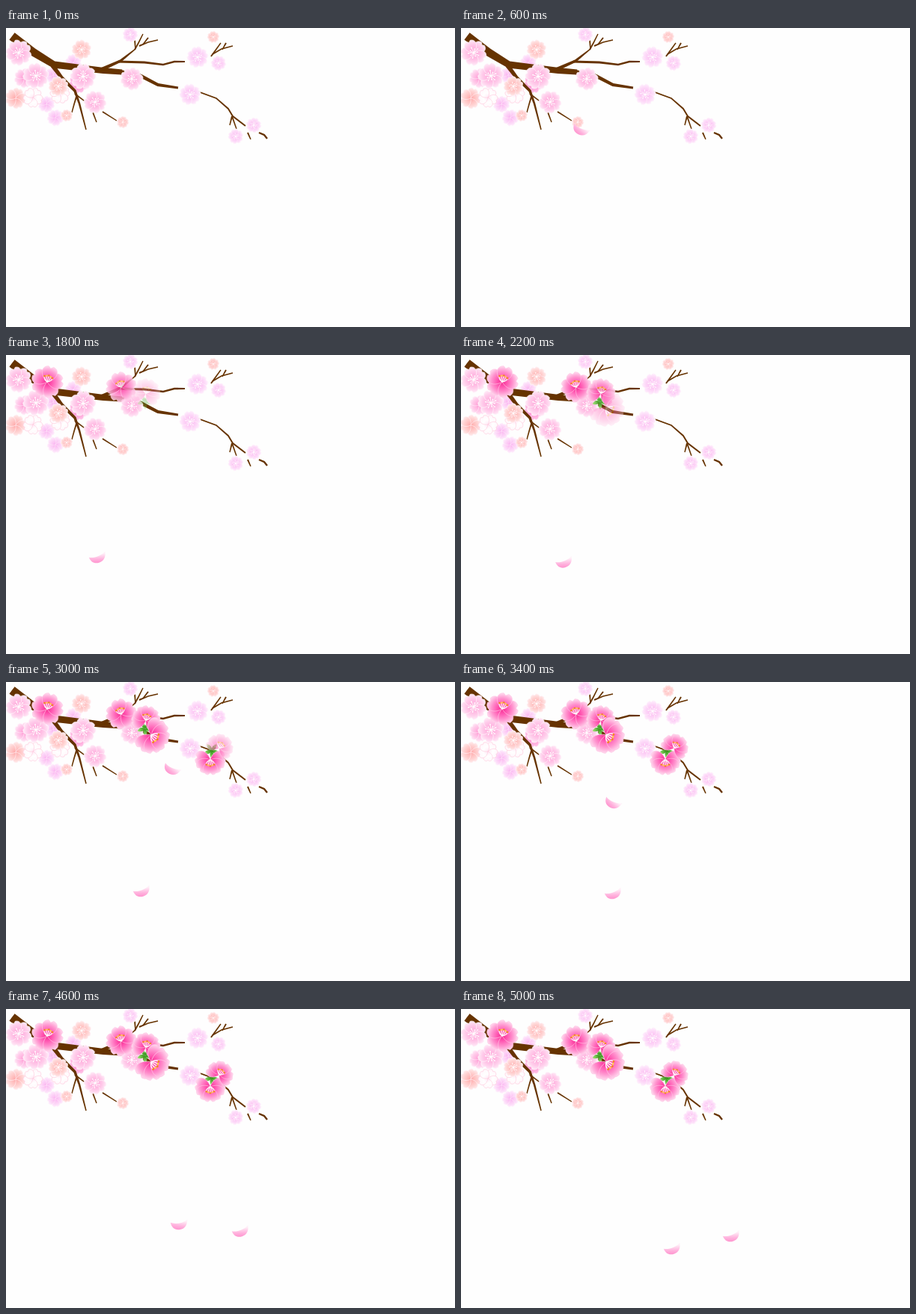
An HTML page for the animation above (5.2 s loop, 600 by 400 pixels).

```html
<!DOCTYPE html>
<html lang="en">
<head>
<meta charset="utf-8">
<title>Blossom branch</title>
<style>
html, body { margin: 0; width: 100%; height: 100%; overflow: hidden; background: #fefefe; }
svg { display: block; width: 600px; height: 400px; }
</style>
</head>
<body>
<svg viewBox="0 0 600 400" xmlns="http://www.w3.org/2000/svg">
  <defs id="defs">
    <linearGradient id="drop" x1="0" y1="1" x2=".6" y2="0">
      <stop offset="0" stop-color="#ff86c8"/>
      <stop offset=".5" stop-color="#ffb2dd"/>
      <stop offset="1" stop-color="#fff0f8"/>
    </linearGradient>
    <linearGradient id="leaf" x1="0" y1="0" x2="0" y2="1">
      <stop offset="0" stop-color="#2a8c10"/>
      <stop offset="1" stop-color="#a6ea7c"/>
    </linearGradient>
    <path id="lobe" d="M0 0C-.6-.3-.62-.92-.16-1L0-.88L.16-1C.62-.92.6-.3 0 0Z"/>
    <path id="blade" d="M0 0Q-5 5 0 11Q5 5 0 0Z" fill="url(#leaf)"/>
  </defs>
  <g id="back"></g>
  <g id="wood" fill="#663300"></g>
  <g id="front"></g>
  <g id="blooms"></g>
  <g id="falling"></g>
</svg>
<script>
const LOOP = 5200, STEP = 200, FADE = 650;
const el = id => document.getElementById(id);
const clamp = v => Math.max(0, Math.min(1, v));
const points = text => text.split(' ').map(p => p.split(',').map(Number));

function add(parent, tag, attrs = {}) {
  const node = document.createElementNS('http://www.w3.org/2000/svg', tag);
  for (const key in attrs) node.setAttribute(key, attrs[key]);
  parent.appendChild(node);
  return node;
}

function radial(id, ...colors) {
  const g = add(el('defs'), 'radialGradient', { id, gradientUnits: 'userSpaceOnUse', cx: 0, cy: 0, r: 1 });
  colors.forEach((c, i) => add(g, 'stop', { offset: i / (colors.length - 1), 'stop-color': c }));
}

radial('pink', '#ff92d0', '#ffb4e0', '#ffcbea', '#ffeaf7');
radial('salmon', '#ffa3a3', '#ffbebe', '#ffd2d2', '#ffecec');
radial('lilac', '#f9acef', '#fcc6f4', '#fdd8f8', '#feeffd');
radial('hot', '#ff7fcb', '#ff9fd8', '#ffc9ea');
radial('white', '#ffeaf6', '#ffffff', '#fff7fb');
radial('bloom', '#f52a90', '#ff58b2', '#ff92ce', '#ffd9ee');

// Tapering branch along a line of points
function limb(w0, w1, text) {
  const line = points(text), last = line.length - 1, left = [], right = [];
  line.forEach(([x, y], i) => {
    const a = line[Math.max(0, i - 1)], b = line[Math.min(last, i + 1)];
    const dx = b[0] - a[0], dy = b[1] - a[1];
    const k = (w0 + (w1 - w0) * i / last) / 2 / Math.hypot(dx, dy);
    left.push([x + dy * k, y - dx * k]);
    right.unshift([x - dy * k, y + dx * k]);
  });
  add(el('wood'), 'polygon', { points: left.concat(right).join(' ') });
}

function blossom(layer, fill, r, x, y, star, edge) {
  const g = add(el(layer), 'g', { transform: `translate(${x} ${y}) rotate(${x * 7 % 72}) scale(${r})` });
  for (let i = 0; i < 5; i++)
    add(g, 'use', { href: '#lobe', transform: `rotate(${i * 72})`, fill: `url(#${fill})`, stroke: edge, 'stroke-width': .04 });
  for (let i = 0; star && i < 10; i++) {
    const cy = i % 2 ? -.3 : -.43, ray = add(g, 'g', { transform: `rotate(${i * 36})`, fill: '#fff' });
    add(ray, 'path', { d: `M0 0V${cy}`, stroke: '#fff', 'stroke-width': .05 });
    add(ray, 'circle', { cy, r: .05 });
  }
}

function scatter(layer, fill, r, text, edge = '#fff5fb') {
  for (const [x, y] of points(text)) blossom(layer, fill, r, x, y, layer === 'front', edge);
}

function leaves(parent, x, y) {
  for (let i = 0; i < 5; i++)
    add(parent, 'use', { href: '#blade', transform: `translate(${x} ${y}) rotate(${i * 72})` });
}

// Petals fan out from the base around `aim`; a spread of 72 makes a full circle
function bloom(x, y, size, aim, spread, leafAt) {
  const node = add(el('blooms'), 'g');
  if (leafAt) leaves(node, ...leafAt);
  const g = add(node, 'g', { transform: `translate(${x} ${y}) rotate(${aim}) scale(${size})` });
  for (const i of [-2, 2, -1, 1, 0])
    add(g, 'use', { href: '#lobe', transform: `rotate(${i * spread})`, fill: 'url(#bloom)', stroke: '#ffc6e5', 'stroke-width': .03 });
  for (let i = -2; i <= 2; i++) {
    const px = i * .13, py = Math.abs(i) * .05 - .42;
    add(g, 'path', { d: `M0 0Q${px} -.1 ${px} ${py}`, fill: 'none', stroke: '#fff', 'stroke-width': .055 });
    add(g, 'circle', { cx: px, cy: py, r: .06, fill: i % 2 ? '#ffd24a' : '#f28a1c' });
  }
  return node;
}

limb(12, 7, '8,11 36,32 64,49 130,57 155,59');
limb(6, 3, '153,59 180,64 203,76 230,80');
limb(6, 1.5, '62,50 74,66 92,84 98,101 107,136');
limb(5, 1.5, '124,57 153,44 173,28');
limb(3, 2.2, '150,45 185,46 210,49 225,45 239,45');
limb(1.8, 2, '254,84 281,94 297,108 303,118 320,131');
limb(2.4, 2.4, '338,140 345,143 349,148');
[
  '172,29 177,20 183,8', '172,16 173,28', '178,24 190,19 203,16', '190,13 183,22',
  '274,38 287,20', '276,35 288,28 303,24', '294,20 289,29',
  '92,88 108,100', '94,92 91,102 88,113', '115,110 121,126', '129,112 148,124',
  '302,118 308,135', '302,118 299,130', '323,140 327,149'
].forEach(text => limb(2, 1.4, text));

scatter('back', 'pink', 13, '24,67');
scatter('back', 'lilac', 11, '63,63 90,46 54,102 66,120');
scatter('back', 'hot', 13, '97,74');
scatter('back', 'salmon', 14, '13,94');
scatter('back', 'white', 13, '36,93 72,88', '#ffc4d8');

scatter('front', 'pink', 17, '17,33 40,64 103,65');
scatter('front', 'pink', 15, '168,68 119,99');
scatter('front', 'salmon', 13, '101,29 70,78');
scatter('front', 'salmon', 8, '81,117 156,126 277,12');
scatter('front', 'lilac', 14, '256,39 246,89');
scatter('front', 'lilac', 10, '166,9 284,47 331,130 307,145');

const blooms = [
  bloom(55, 36, 21, 15, 72),
  bloom(154, 43, 20, -15, 72),
  bloom(187, 51, 19, 12, 55, [186, 62]),
  bloom(194, 71, 24, 125, 48),
  bloom(273, 104, 20, 180, 50, [275, 92]),
  bloom(285, 88, 18, 30, 45)
];

// Places passed every SPAN ms; each petal tips over around `turn`
const SPAN = 800;
const drops = [
  { start: 200, turn: 1250, path: points('168,68 149,212 123,271 162,277 204,283 259,290 362,304') },
  { start: 2600, turn: 4450, path: points('238,82 203,162 183,245 283,321') }
];
for (const d of drops)
  d.node = add(el('falling'), 'path', { d: 'M-11.5-4C-5-.5 5-1 11.5-5C10 3 6 6.5 0 6.8C-7 7-11 3-11.5-4Z', fill: 'url(#drop)' });

// Catmull-Rom curve
function along(path, pos, c) {
  const last = path.length - 1, i = Math.min(Math.floor(pos), last - 1);
  const [a, b, e, f] = [-1, 0, 1, 2].map(k => path[Math.max(0, Math.min(last, i + k))][c]);
  const u = pos - i;
  return b + u / 2 * (e - a + u * (2 * a - 5 * b + 4 * e - f + u * (3 * (b - e) + f - a)));
}

function draw(t) {
  blooms.forEach((node, i) => node.setAttribute('opacity', clamp((t - 900 - 350 * i) / FADE)));
  for (const { node, start, turn, path } of drops) {
    node.setAttribute('visibility', t < start ? 'hidden' : 'visible');
    const pos = Math.max(0, t - start) / SPAN, u = clamp((t - turn) / 800 + .5);
    const angle = 25 - 43 * u * u * (3 - 2 * u);
    node.setAttribute('transform', `translate(${along(path, pos, 0)} ${along(path, pos, 1)}) rotate(${angle})`);
  }
}

const begin = performance.now();
function tick() {
  const t = (performance.now() - begin) % LOOP;
  draw(Math.floor(t / STEP) * STEP);
  requestAnimationFrame(tick);
}
tick();
</script>
</body>
</html>
```
